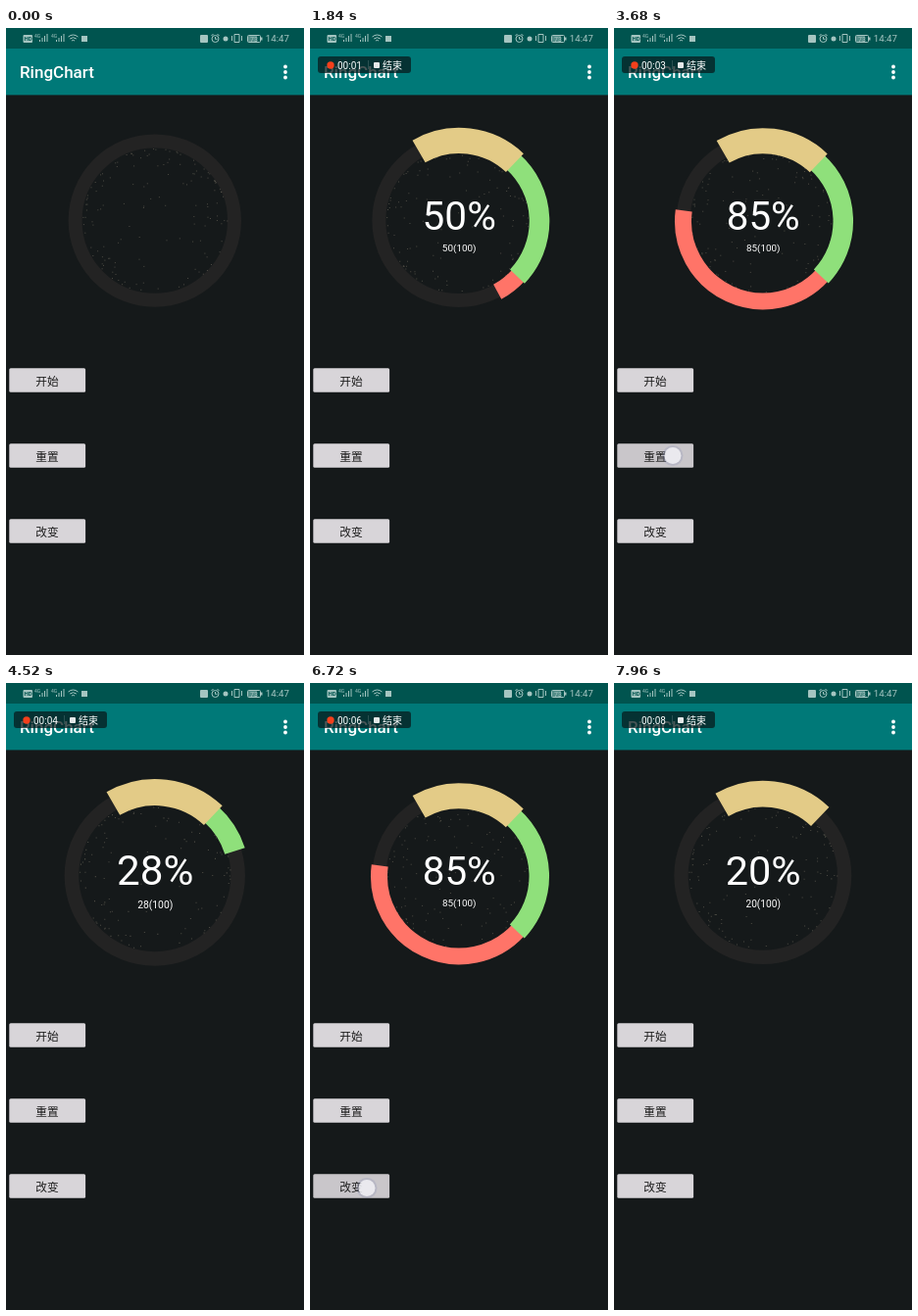
Animation of 304 by 640 pixels, one loop 8000 ms. Source, as an HTML page:

```html
<!DOCTYPE html>
<html lang="zh">
<head>
<meta charset="utf-8">
<title>Ring</title>
<style>
html, body { margin: 0; width: 100%; height: 100%; overflow: hidden; background: #15191a; }
svg { display: block; width: 304px; height: 640px; font-family: Roboto, "Noto Sans CJK SC", "Noto Sans CJK", sans-serif; }
.status { fill: #a5c5c1; stroke: none; font-size: 9.7px; }
.line { fill: none; stroke: #a5c5c1; stroke-width: 1; }
.arc { fill: none; }
.center { fill: #fff; text-anchor: middle; }
.button rect { fill: #d8d5d9; }
.button .ripple { fill: #000; }
.button text { fill: #1c1c1c; font-size: 11.7px; text-anchor: middle; }
</style>
</head>
<body>
<svg viewBox="0 0 304 640">
  <defs>
    <g id="signal">
      <text class="status" y="10" style="font-size:5px">4G</text>
      <path class="line" d="M5.5 14v-2M8 14v-4M10.5 14v-6M13 14v-8"/>
    </g>
  </defs>
  <rect width="304" height="640" fill="#15191a"/>
  <rect width="304" height="68.400" fill="#007978"/>
  <rect width="304" height="21" fill="#00544f"/>

  <rect class="status" x="17.500" y="7" width="9.500" height="8" rx="1"/>
  <text x="18.600" y="13.200" font-size="6" font-weight="700" fill="#00544f">HD</text>
  <use href="#signal" x="29"/><use href="#signal" x="46"/>
  <path class="line" d="M63.5 9q5-4 10 0M65.2 11q3.3-2.6 6.6 0M67 13q1.5-1.2 3 0"/>
  <rect class="status" x="77" y="8" width="6" height="6"/>
  <rect class="status" x="198" y="7" width="8" height="8" rx="1"/>
  <circle class="line" cx="213.500" cy="11" r="3.500"/>
  <path class="line" d="M213.500 9v2.300h2M209.500 8l2-2M217.500 8l-2-2"/>
  <circle class="status" cx="224" cy="11" r="2.500"/>
  <path class="line" d="M233 6.500h5v8h-5zM230.500 8v5M240.500 8v5"/>
  <rect class="line" x="246.500" y="7.500" width="13" height="7" rx="1"/>
  <rect class="status" x="247" y="8" width="9" height="6" opacity=".5"/>
  <rect class="status" x="260" y="9.500" width="1.500" height="3"/>
  <text class="status" x="249" y="13.600" style="font-size:7px">73</text>
  <text class="status" x="264.800" y="14.300">14:47</text>

  <text x="14" y="51" font-size="17" font-weight="500" fill="#fff">RingChart</text>
  <g fill="#fff"><circle cx="285" cy="39.500" r="1.900"/><circle cx="285" cy="45" r="1.900"/><circle cx="285" cy="50.500" r="1.900"/></g>

  <g id="recorder">
    <rect x="8" y="29" width="95" height="17" rx="3" fill="#071a1b" fill-opacity=".74"/>
    <circle id="blink" cx="21" cy="38" r="3.700" fill="#f4401c"/>
    <text id="clock" x="28" y="41.700" font-size="10" fill="#fff"></text>
    <path d="M59.500 33v9" stroke="#fff" stroke-opacity=".15"/>
    <rect x="65" y="35" width="6" height="6" rx="1" fill="#e4e8e8"/>
    <text x="74" y="41.700" font-size="10" fill="#fff">结束</text>
  </g>

  <g id="gauge">
    <circle r="81.200" fill="none" stroke="#232323" stroke-width="14"/>
    <path id="specks" stroke="#a59c87" stroke-opacity=".38"/>
    <g id="arcs" transform="translate(.4 .6)"></g>
    <g id="labels">
      <text id="percent" class="center" x=".4" y="9.400" font-size="40.400"></text>
      <text id="detail" class="center" x=".4" y="31.800" font-size="9.900"></text>
    </g>
  </g>
  <g id="buttons"></g>
  <g id="touch">
    <circle r="10.500" fill="#7d86b0" fill-opacity=".22"/>
    <circle r="8.500" fill="#f2f2f6" fill-opacity=".85"/>
  </g>
</svg>
<script>
const LOOP = 8000, RATE = 0.037, FULL = 85;
const START_ANGLE = -28.4, LEAD = 0.45; // each arc begins slightly under the previous one
const PULSE = 1550, FADE = 450, CLOCK_SHIFT = 110;

const segments = [
  { from: 45, to: 85, radius: 81.7, width: 17, color: '#ff7468' },
  { from: 20, to: 45, radius: 81.6, width: 20.5, color: '#8fe07b' },
  { from: 0, to: 20, radius: 82, width: 26, color: '#e3cb87' }
];
const runs = [
  { begin: 471, end: 3756 },
  { begin: 3756, end: 6800 },
  { begin: 7409, end: LOOP }
];
const buttons = [{ label: '开始', y: 347 }, { label: '重置', y: 424 }, { label: '改变', y: 501 }];
const taps = [
  { button: 0, down: 320, up: 471, x: 59, y: 360 },
  { button: 1, down: 3600, up: 3756, x: 60, y: 436.5 },
  { button: 2, down: 6640, up: 6800, x: 58, y: 515.5 },
  { button: 0, down: 7260, up: 7409, x: 59, y: 360 }
];

const $ = id => document.getElementById(id);
const clamp = (v, lo, hi) => Math.min(hi, Math.max(lo, v));
const show = (node, on) => node.setAttribute('visibility', on ? 'visible' : 'hidden');

function add(parent, tag, attrs) {
  const node = document.createElementNS('http://www.w3.org/2000/svg', tag);
  for (const key in attrs) node.setAttribute(key, attrs[key]);
  return parent.appendChild(node);
}

function polar(radius, percent) {
  const a = (START_ANGLE + percent * 3.6 - 90) * Math.PI / 180;
  return `${(radius * Math.cos(a)).toFixed(2)} ${(radius * Math.sin(a)).toFixed(2)}`;
}

for (const s of segments) {
  s.node = add($('arcs'), 'path', { class: 'arc', stroke: s.color, 'stroke-width': s.width });
}
for (const b of buttons) {
  const box = { x: 3.3, y: b.y + 0.3, width: 77.8, height: 24.4, rx: 1.5 };
  const group = add($('buttons'), 'g', { class: 'button' });
  add(group, 'rect', box);
  b.ripple = add(group, 'rect', { ...box, class: 'ripple' });
  add(group, 'text', { x: 42, y: b.y + 17.8 }).textContent = b.label;
}

let seed = 11;
const random = () => (seed = seed * 16807 % 2147483647) / 2147483647;
const specks = Array.from({ length: 140 }, () => ({
  angle: random() * 2 * Math.PI, reach: random() * 0.95, phase: random(), laps: 2 + Math.floor(random() * 3)
}));

function drawSpecks(t) {
  $('specks').setAttribute('d', specks.map(s => {
    const p = (s.phase + s.laps * t / LOOP) % 1;
    const r = 73.5 * (1 - s.reach * p * p);
    return `M${(r * Math.cos(s.angle)).toFixed(1)} ${(r * Math.sin(s.angle)).toFixed(1)}h1`;
  }).join(''));
}

function drawGauge(t) {
  const run = runs.find(r => t >= r.begin && t < r.end);
  const age = run ? t - run.begin : 0;
  const value = Math.floor(Math.min(FULL, age * RATE));
  const eased = (1 - Math.cos(Math.PI * clamp(age / PULSE, 0, 1))) / 2;
  const scale = 1 + 0.046 * (1 - Math.abs(2 * eased - 1));
  $('gauge').setAttribute('transform', `translate(151.8 196.6) scale(${scale})`);
  for (const s of segments) {
    const end = Math.min(s.to, value);
    s.node.setAttribute('d', end > s.from
      ? `M${polar(s.radius, s.from - LEAD)}A${s.radius} ${s.radius} 0 0 1 ${polar(s.radius, end)}` : '');
  }
  show($('labels'), run);
  $('percent').textContent = value + '%';
  $('detail').textContent = value + '(100)';
}

function drawTaps(t) {
  const touch = taps.find(p => t >= p.down && t < p.up);
  show($('touch'), touch);
  if (touch) $('touch').setAttribute('transform', `translate(${touch.x} ${touch.y})`);
  buttons.forEach((b, i) => {
    const tap = taps.find(p => p.button === i && t >= p.down && t < p.up + FADE);
    const strength = tap ? Math.min((t - tap.down) / 100, 1, 1 - (t - tap.up) / FADE) : 0;
    b.ripple.setAttribute('fill-opacity', 0.09 * strength);
  });
}

function drawRecorder(t) {
  const clock = t + CLOCK_SHIFT;
  const on = t >= 200;
  show($('recorder'), on);
  show($('blink'), on && clock % 1000 >= 500);
  $('clock').textContent = '00:0' + Math.floor(clock / 1000);
}

let origin;
function frame(now) {
  origin ??= now;
  const t = (now - origin) % LOOP;
  drawSpecks(t);
  drawGauge(t);
  drawTaps(t);
  drawRecorder(t);
  requestAnimationFrame(frame);
}
requestAnimationFrame(frame);
</script>
</body>
</html>
```
